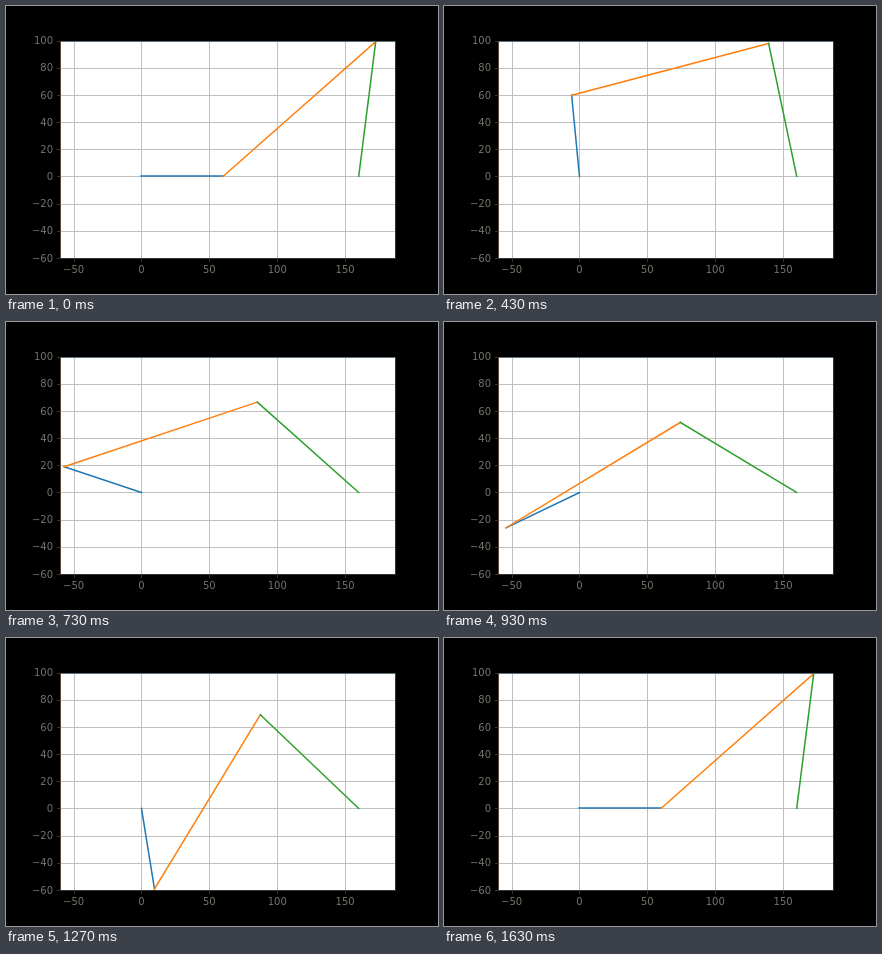
These frames come from a looping animation (432 by 288 pixels, 1660 ms). An HTML page with a canvas:

```html
<!DOCTYPE html>
<html lang="en">
<head>
<meta charset="utf-8">
<title>Four-bar linkage</title>
<style>
  html, body { margin: 0; width: 100%; height: 100%; overflow: hidden; background: #000; }
  canvas { display: block; width: 432px; height: 288px; }
</style>
</head>
<body>
<canvas id="stage" width="432" height="288"></canvas>
<script>
const ctx = document.getElementById('stage').getContext('2d');

// Linkage lengths in data units
const GROUND = 160, CRANK = 60, COUPLER = 150, ROCKER = 100;

// Plot area in pixels and data limits
const box = { left: 54, top: 34.56, right: 388.8, bottom: 252 };
const X_MIN = -60, Y_MIN = -60, Y_MAX = 100;
const X_MAX = ((CRANK + COUPLER) ** 2 + GROUND ** 2 - ROCKER ** 2) / (2 * GROUND);

const LOOP = 1660, FRAME = 100 / 3, LAST = 49;

const px = x => box.left + (x - X_MIN) / (X_MAX - X_MIN) * (box.right - box.left);
const py = y => box.bottom - (y - Y_MIN) / (Y_MAX - Y_MIN) * (box.bottom - box.top);

const range = (from, to, step) =>
  Array.from({ length: (to - from) / step + 1 }, (_, i) => from + i * step);
const xTicks = range(-50, 150, 50);
const yTicks = range(-60, 100, 20);

// Plot frame on whole pixels
const L = 54, T = 35, R = 389, B = 252;

function rect(color, x, y, w, h) {
  ctx.fillStyle = color;
  ctx.fillRect(x, y, w, h);
}

function drawGrid() {
  rect('#000', 0, 0, 432, 288);
  rect('#fff', L, T, R - L, B - T);
  for (const x of xTicks) rect('#c0c0c0', Math.round(px(x)), T, 1, B - T);
  for (const y of yTicks) rect('#c0c0c0', L, Math.round(py(y)), R - L, 1);
}

function drawAxes() {
  rect('#5a7078', L, T, R - L, 1);
  rect('#333', R, T, 1, B - T + 1);
  rect('#333', L, B, R - L + 1, 1);
  rect('#5a4632', L, T, 1, B - T);

  ctx.font = '10px "DejaVu Sans", sans-serif';
  const label = v => String(v).replace('-', '\u2212');
  const ink = '#77736a';
  ctx.textBaseline = 'alphabetic';

  ctx.textAlign = 'center';
  for (const x of xTicks) {
    rect('#333', Math.round(px(x)), B + 1, 1, 3);
    ctx.fillStyle = ink;
    ctx.fillText(label(x), px(x), 267);
  }
  ctx.textAlign = 'right';
  for (const y of yTicks) {
    rect('#333', L - 3, Math.round(py(y)), 3, 1);
    ctx.fillStyle = ink;
    ctx.fillText(label(y), 47, Math.round(py(y) + 3.65));
  }
}

// Upper meeting point of the coupler and the rocker
function joint(p) {
  const dx = GROUND - p.x, dy = -p.y;
  const d = Math.hypot(dx, dy);
  const along = (COUPLER ** 2 - ROCKER ** 2 + d * d) / (2 * d);
  const off = Math.sqrt(Math.max(0, COUPLER ** 2 - along ** 2));
  return {
    x: p.x + (along * dx - off * dy) / d,
    y: p.y + (along * dy + off * dx) / d
  };
}

function bar(color, a, b) {
  let pts = [px(a.x), py(a.y), px(b.x), py(b.y)];
  // Level bars sit on whole pixels
  if (Math.abs(a.y - b.y) < 1e-6) pts = pts.map(Math.round);
  ctx.strokeStyle = color;
  ctx.beginPath();
  ctx.moveTo(pts[0], pts[1]);
  ctx.lineTo(pts[2], pts[3]);
  ctx.stroke();
}

function drawLinkage(step) {
  const angle = 2 * Math.PI * step / LAST;
  const base = { x: 0, y: 0 }, pivot = { x: GROUND, y: 0 };
  const p = { x: CRANK * Math.cos(angle), y: CRANK * Math.sin(angle) };
  const q = joint(p);

  ctx.save();
  ctx.beginPath();
  ctx.rect(L, T, R - L, B - T);
  ctx.clip();
  ctx.lineWidth = 1.5;
  ctx.lineCap = 'square';
  bar('#1f77b4', base, p);
  bar('#ff7f0e', p, q);
  bar('#2ca02c', q, pivot);
  ctx.restore();
}

// Steps start at multiples of FRAME rounded to 10 ms
function stepAt(ms) {
  let step = 0;
  while (step < LAST && Math.round((step + 1) * FRAME / 10) * 10 <= ms) step++;
  return step;
}

function draw(ms) {
  drawGrid();
  drawLinkage(stepAt(ms));
  drawAxes();
}

const start = performance.now();
function tick() {
  draw((performance.now() - start) % LOOP);
  requestAnimationFrame(tick);
}
tick();
</script>
</body>
</html>
```
